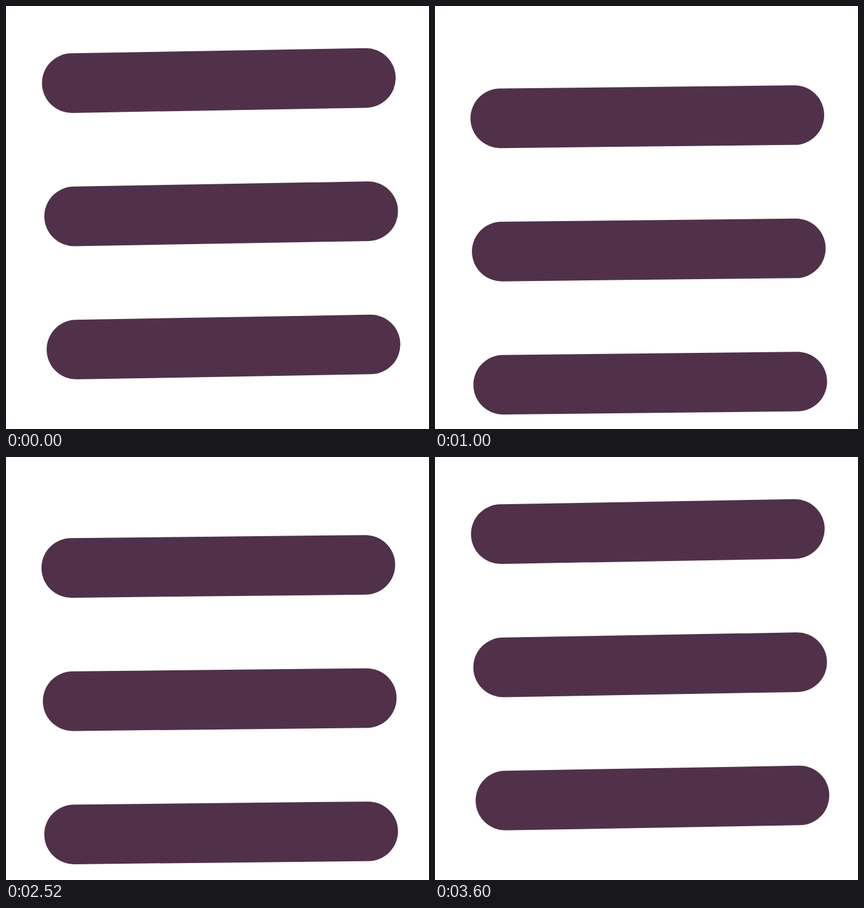
An HTML page for the animation above (3620 ms loop, 700 px wide and 700 px high).

```html
<!DOCTYPE html>
<html lang="en">
<head>
<meta charset="utf-8">
<title>Swaying menu bars</title>
<style>
  html, body { margin: 0; width: 100%; height: 100%; overflow: hidden; background: #fff; }
  svg { display: block; width: 100%; height: 100%; }
</style>
</head>
<body>
<svg viewBox="0 0 700 700">
  <path id="bars" d="M106.6 129.5H593.4M106.6 350H593.4M106.6 570.5H593.4"
        stroke="#503149" stroke-width="98.6" stroke-linecap="round"/>
</svg>
<script>
  const LOOP = 3620, STEP = 20;
  const bars = document.getElementById('bars');

  // Turning points in ms; each value swings between its two extremes.
  const tiltTurns = [0, 520, 1192, 1692, 2370, 2882, 3600];
  const dropTurns = [0, 880, 1800, 2680, 3600];

  // Sine-eased swing: `low` at even turning points, `high` at odd ones.
  function swing(t, turns, low, high) {
    let i = 0;
    while (i < turns.length - 2 && t >= turns[i + 1]) i++;
    const p = Math.min(1, (t - turns[i]) / (turns[i + 1] - turns[i]));
    const eased = (1 - Math.cos(Math.PI * p)) / 2;
    return low + (high - low) * (i % 2 ? 1 - eased : eased);
  }

  function draw(now) {
    const t = Math.floor((now % LOOP) / STEP) * STEP;
    const drop = swing(t, dropTurns, 0, 60);
    const tilt = swing(t, tiltTurns, -1, 1);
    bars.setAttribute('transform', `translate(0 ${drop}) rotate(${tilt})`);
    requestAnimationFrame(draw);
  }
  requestAnimationFrame(draw);
</script>
</body>
</html>
```
